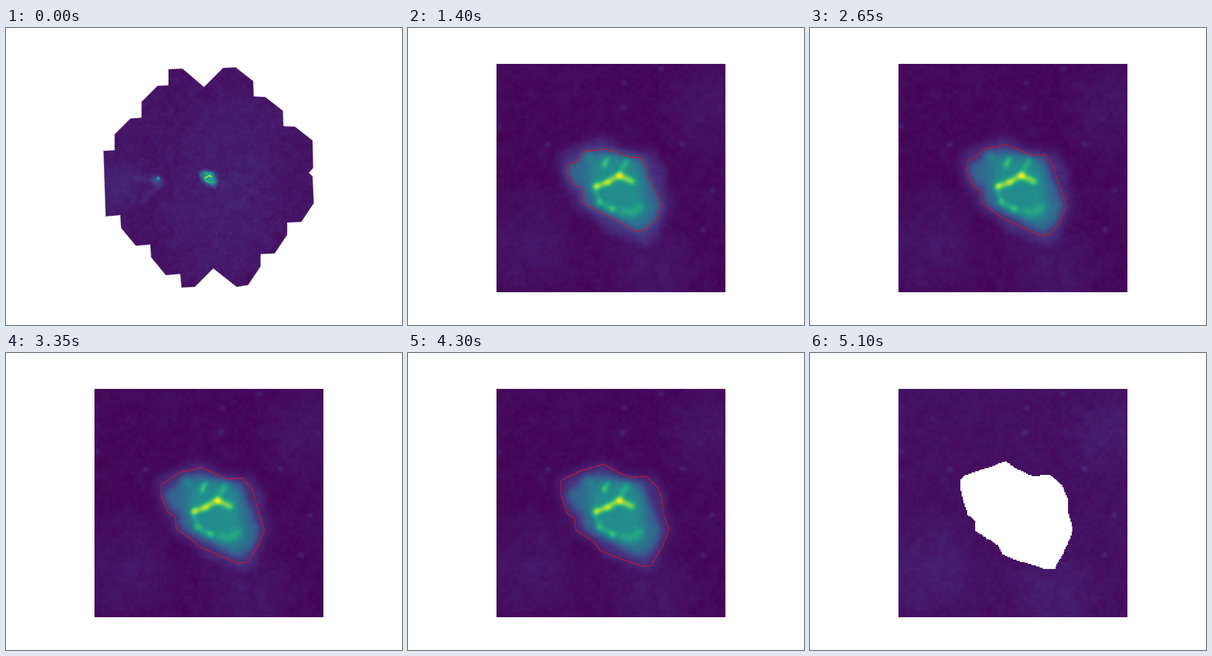
An HTML page with a canvas for the animation above (5.6 s loop, 640 by 480 pixels).

```html
<!DOCTYPE html>
<html>
<head>
<meta charset="utf-8">
<style>
html, body { margin: 0; width: 100%; height: 100%; overflow: hidden; background: #fff; }
canvas { display: block; }
</style>
</head>
<body>
<canvas id="stage" width="640" height="480"></canvas>
<script>
const W = 640, H = 480, X = 143, Y = 58, SIZE = 370;
const START = 1400, END = 5100;
const VIRIDIS = ['440154', '472d7b', '3b528b', '2c728e', '21918c', '28ae80', '5ec962', 'addc30', 'fde725']
  .map(h => [0, 2, 4].map(i => parseInt(h.slice(i, i + 2), 16)));

const points = text => text.split(' ').map(p => p.split(',').map(Number));

// Matching points of an early and the final contour.
const INNER = points('316,195 333,199 358,209 377,209 388,229 386,235 399,262 409,287 400,310 384,326 368,329 350,318 322,303 310,297 290,287 283,280 281,259 268,253 258,232 261,219 270,218 286,198 300,198');
const OUTER = points('316,175 335,188 360,199 387,196 407,213 417,236 417,258 425,285 415,312 395,349 382,349 348,339 326,332 311,325 303,310 268,288 266,270 255,261 244,226 243,204 250,198 278,188 300,181');

function outline(pts, closed = true) {
  const path = new Path2D();
  pts.forEach(([x, y]) => path.lineTo(x, y));
  if (closed) path.closePath();
  return path;
}

function contour(t) {
  const k = (t - START) / (END - START);
  return outline(INNER.map(([x, y], i) => [x + (OUTER[i][0] - x) * k, y + (OUTER[i][1] - y) * k]));
}

// Each corner of the survey field is a staircase that repeats three moves.
function stairs(x, y, count, moves) {
  const pts = [[x, y]], cycle = points(moves);
  for (let i = 0; i < count; i++) {
    const [dx, dy] = cycle[i % 3];
    pts.push([x += dx, y += dy]);
  }
  return pts;
}

const field = outline([
  ...stairs(371, 64, 7, '28,22 1,25 19,1'), [496, 226], [489, 234], [495, 240],
  ...stairs(497, 283, 7, '-20,30 -23,1 0,20'), [373, 418], [335, 388], [305, 418], [284, 419],
  ...stairs(282, 397, 7, '-23.5,2 -23.5,-28.5 -1.5,-21'),
  ...stairs(158, 199, 8, '18,-1 0,-26 25.5,-25.5'), [285, 66], [320, 96], [351, 65]
]);

function layer() {
  const c = document.createElement('canvas');
  c.width = W;
  c.height = H;
  const g = c.getContext('2d', { willReadFrequently: true });
  g.globalCompositeOperation = 'lighter';
  g.lineCap = g.lineJoin = 'round';
  return g;
}

// Brightness is painted as added alpha, then coloured.
function ink(g, v, blur) {
  g.filter = `blur(${blur}px)`;
  g.fillStyle = g.strokeStyle = `rgba(255,255,255,${v})`;
}
function area(g, path, v, blur) {
  ink(g, v, blur);
  g.fill(path);
}
function spot(g, x, y, r, v, blur = r * .6) {
  const path = new Path2D();
  path.arc(x, y, r, 0, 7);
  area(g, path, v, blur);
}
function strand(g, text, width, v, blur = 3) {
  ink(g, v, blur);
  g.lineWidth = width;
  g.stroke(outline(points(text), false));
}

function hash(x, y) {
  const s = Math.sin(x * 127.1 + y * 311.7) * 43758.5453;
  return s - Math.floor(s);
}
function noise(x, y) {
  const i = Math.floor(x), j = Math.floor(y), ease = u => u * u * (3 - 2 * u);
  const u = ease(x - i), v = ease(y - j), mix = (a, b, k) => a + (b - a) * k;
  return mix(mix(hash(i, j), hash(i + 1, j), u), mix(hash(i, j + 1), hash(i + 1, j + 1), u), v);
}

function colour(g, base, grain, rough) {
  const img = g.getImageData(0, 0, W, H), d = img.data;
  for (let y = 0, p = 0; y < H; y++) for (let x = 0; x < W; x++, p += 4) {
    const n = noise(x / grain, y / grain) + noise(x / grain * 3, y / grain * 3) - 1;
    const v = Math.min(.999, Math.max(0, d[p + 3] / 255 + base + n * rough)) * 8;
    const i = Math.floor(v), a = VIRIDIS[i], b = VIRIDIS[i + 1];
    for (let c = 0; c < 3; c++) d[p + c] = a[c] + (b[c] - a[c]) * (v - i);
    d[p + 3] = 255;
  }
  g.putImageData(img, 0, 0);
  return g.canvas;
}

function paintNebula() {
  const g = layer();
  area(g, contour(END), .1, 8);
  area(g, contour(START), .21, 6);
  area(g, outline(points('302,212 355,207 374,230 386,298 368,313 312,292 292,242')), .15, 8);
  strand(g, '303,256 322,250 340,238 363,248', 9, .36);
  strand(g, '323,211 318,217 317,223', 6, .34);
  strand(g, '356,212 346,228 342,236', 7, .18);
  strand(g, '302,262 312,284 332,294', 7, .16);
  strand(g, '345,297 362,299 376,289', 11, .14, 4);
  for (const [x, y] of points('323,249 342,240 304,256 309,281 331,293')) spot(g, x, y, 5, .2, 3);
  spot(g, 292, 210, 8, .1);
  return g.canvas;
}

function paintSky() {
  const g = layer();
  spot(g, 485, 130, 55, .035, 25);
  spot(g, 390, 390, 60, .035, 25);
  spot(g, 195, 350, 65, .035, 25);
  for (const [x, y] of points('226,188 350,89 409,66 347,129 147,159 443,187 476,326 492,262'))
    spot(g, x, y, 4, .08, 2);
  return g;
}

function paintSurvey(nebula) {
  const g = layer();
  spot(g, 365, 200, 75, .02, 25);
  spot(g, 350, 310, 80, .025, 25);
  spot(g, 180, 255, 40, .04, 16);
  strand(g, '204,241 222,245 246,246', 4, .08);
  strand(g, '248,256 230,267 219,283', 4, .08);
  spot(g, 244, 247, 8, .18, 4);
  spot(g, 246, 243, 2.5, .45, 1.2);
  for (let i = 0; i < 12; i++) spot(g, 200 + 250 * hash(i, 1), 110 + 260 * hash(i, 2), 1, .12, .4);
  g.filter = 'none';
  g.drawImage(nebula, 265.4, 194.5, W * .185, H * .185);
  return colour(g, .055, 12, .025);
}

const ctx = document.getElementById('stage').getContext('2d');
const nebula = paintNebula();
const survey = paintSurvey(nebula);
const empty = colour(paintSky(), .042, 18, .023);
const sky = paintSky();
sky.filter = 'none';
sky.drawImage(nebula, 0, 0);
const zoom = colour(sky, .022, 18, .022);
const hole = contour(END);

function crop(img) {
  ctx.drawImage(img, X, Y, SIZE, 369, X, Y, SIZE, 369);
}

function drawSurvey() {
  ctx.save();
  ctx.clip(field);
  ctx.drawImage(survey, 0, 0);
  ctx.restore();
  // Toothed rim
  ctx.setLineDash([1.5, 1.5]);
  ctx.strokeStyle = '#450b5b';
  ctx.lineWidth = 1.6;
  ctx.stroke(field);
  ctx.setLineDash([]);
}

function drawHole() {
  const cell = SIZE / 200;
  ctx.fillStyle = '#fff';
  for (let j = 0; j < 200; j++) for (let i = 0; i < 200; i++) {
    const x = X + i * cell, y = Y + j * cell;
    if (ctx.isPointInPath(hole, x + cell / 2, y + cell / 2))
      ctx.fillRect(Math.round(x), Math.round(y), 2, 2);
  }
}

let last = -1;
function draw() {
  const t = Math.floor(performance.now() % 5600 / 50) * 50;
  if (t !== last) {
    last = t;
    ctx.fillStyle = '#fff';
    ctx.fillRect(0, 0, W, H);
    if (t < 500) drawSurvey();
    else if (t < END) {
      crop(zoom);
      if (t >= 1000) {
        ctx.strokeStyle = '#c8152d';
        ctx.lineWidth = 1.3;
        ctx.stroke(contour(t));
      }
    } else {
      crop(empty);
      drawHole();
    }
  }
  requestAnimationFrame(draw);
}
draw();
</script>
</body>
</html>
```
